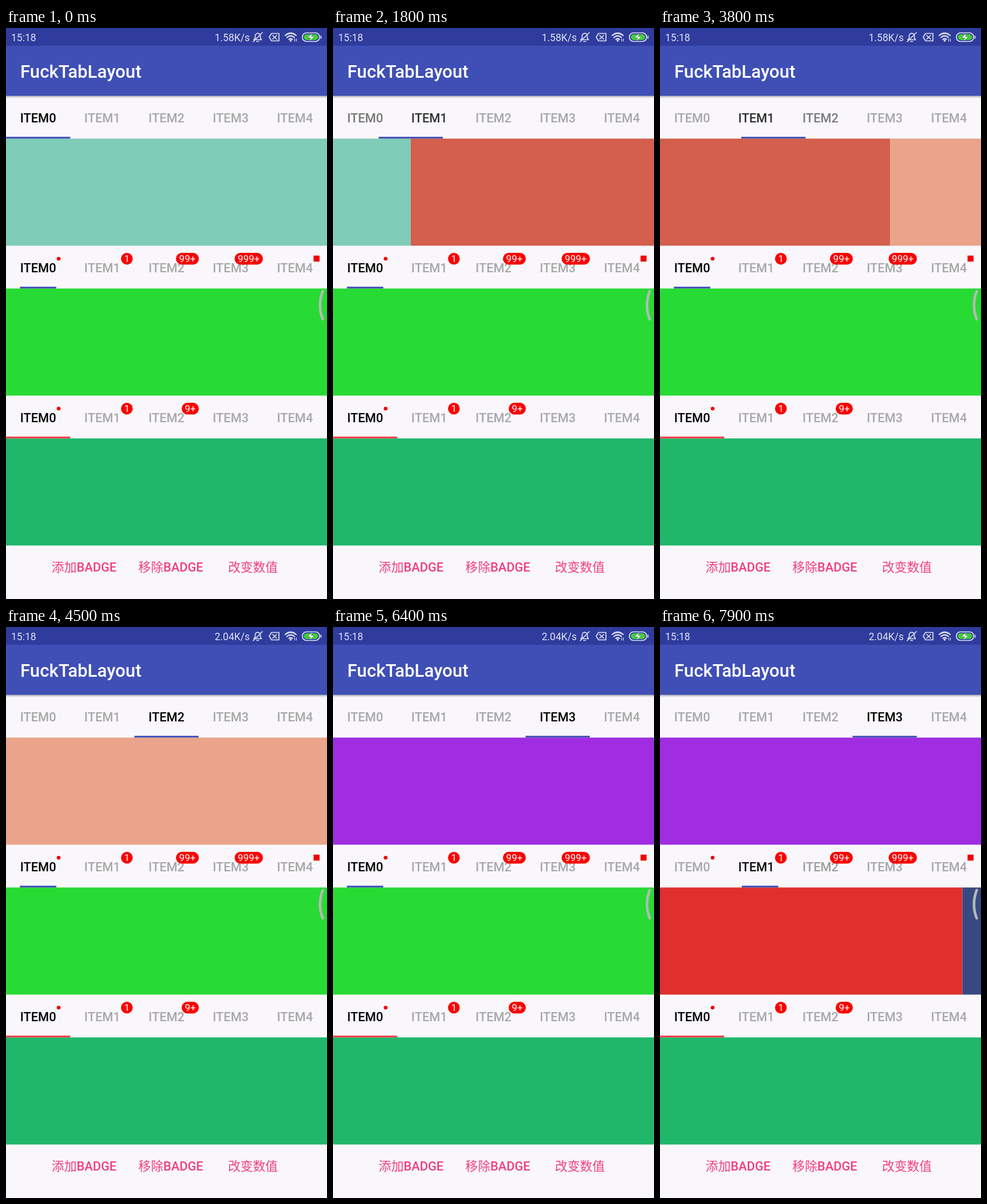
Animation of 561x998 px, one loop 8 s. Source, as an HTML page:

```html
<!DOCTYPE html>
<html lang="zh">
<head>
<meta charset="utf-8">
<title>Tab layout</title>
<style>
  html, body { margin: 0; width: 100%; height: 100%; overflow: hidden; background: #f9f7fb; }
  svg { display: block; width: 100%; height: 100%; }
  text { font-family: Roboto, "Noto Sans CJK SC", "Noto Sans CJK", sans-serif; }
  .tab { font-size: 21.8px; font-weight: 500; text-anchor: middle; }
  .badge { font-size: 17px; fill: #fff; text-anchor: middle; }
  .button { font-size: 21.8px; fill: #f23e80; text-anchor: middle; }
  .button tspan { font-weight: 500; }
  .status { font-size: 17.5px; fill: #dfe2f2; }
  .icon { fill: none; stroke: #dfe2f2; stroke-width: 1.7; stroke-linecap: round; stroke-linejoin: round; }
</style>
</head>
<body>
<svg id="stage" viewBox="0 0 561 998">
  <defs>
    <linearGradient id="shade" x2="0" y2="1">
      <stop stop-color="#000" stop-opacity=".32"/>
      <stop offset="1" stop-color="#000" stop-opacity="0"/>
    </linearGradient>
  </defs>
  <rect width="561" height="998" fill="#f9f7fb"/>
  <g id="rows"></g>

  <rect y="118" width="561" height="5" fill="url(#shade)"/>
  <rect width="561" height="118.5" fill="#3f4fb5"/>
  <rect width="561" height="31" fill="#2f3c9d"/>
  <text x="25" y="87" font-size="31.2" font-weight="500" fill="#fff">FuckTabLayout</text>

  <text class="status" x="9" y="23" font-size="18">15:18</text>
  <text class="status" id="speed" x="426" y="22.5" text-anchor="end"></text>
  <g class="icon">
    <path d="M433 20.5H446.5L444.5 17.5V13.5C444.5 8 435.5 8 435.5 13.5V17.5ZM438 23.5H441.5M432 24L448 8"/>
    <path d="M464 9.5H477V22.5H464L460 16ZM466 13L473 19.5M473 13L466 19.5"/>
    <path stroke-width="2.2" d="M488 13Q497.500 5 507 13M491 16.500Q497.500 11 504 16.500M494.500 19.800Q497.500 17.500 500.500 19.800"/>
    <path stroke-width="1.2" d="M504.500 19V23M507.500 19V23"/>
    <circle cx="497.500" cy="22" r="1" fill="#dfe2f2"/>
    <rect x="518" y="8.500" width="30" height="15" rx="7"/>
    <path d="M550.500 14V18"/>
  </g>
  <rect x="520.500" y="11" width="25" height="10" rx="5" fill="#43cf35"/>
  <path d="M535.500 9L527 17H532.500L530.500 23L539 15H533.500Z" fill="#fff" stroke="#3b5c70" stroke-width=".6"/>

  <text class="button" x="136.500" y="950">添加<tspan>BADGE</tspan></text>
  <text class="button" x="288" y="950">移除<tspan>BADGE</tspan></text>
  <text class="button" x="431.500" y="950">改变数值</text>
  <path d="M553.500 460Q544 485 553.500 509" fill="none" stroke="#b4bab6" stroke-width="4.600" stroke-linecap="round"/>
</svg>
<script>
const W = 561, TAB = W / 5, LOOP = 8000, STEP = 100;
const svgNS = 'http://www.w3.org/2000/svg';
const speed = document.getElementById('speed');

function add(parent, tag, attrs, label) {
  const el = document.createElementNS(svgNS, tag);
  for (const k in attrs) el.setAttribute(k, attrs[k]);
  if (label) el.textContent = label;
  return parent.appendChild(el);
}

// Monotone cubic through [time, position] keys
function track(keys) {
  const slope = i => (keys[i + 1][1] - keys[i][1]) / (keys[i + 1][0] - keys[i][0]);
  const tangent = i => {
    if (i < 1 || i > keys.length - 2) return 0;
    const a = slope(i - 1), b = slope(i);
    return a * b > 0 ? 2 * a * b / (a + b) : 0;
  };
  return t => {
    if (t <= keys[0][0]) return keys[0][1];
    const i = keys.findIndex((k, n) => n < keys.length - 1 && t < keys[n + 1][0]);
    if (i < 0) return keys[keys.length - 1][1];
    const [t0, p0] = keys[i], [t1, p1] = keys[i + 1];
    const d = t1 - t0, u = (t - t0) / d, v = 1 - u;
    return p0 * v * v * (1 + 2 * u) + p1 * u * u * (3 - 2 * u)
      + d * u * v * (v * tangent(i) - u * tangent(i + 1));
  };
}

const rows = [
  {
    y: 118.5, pages: ['#7fccb8', '#d35f4c', '#e9a48b', '#a02de2'],
    bar: '#3f4fb5', inset: 0, lag: 60, badges: [],
    pos: track([[500, 0], [1300, .35], [1800, .758], [2150, 1], [2400, 1], [2800, 1.264],
      [3720, 1.264], [3800, 1.2825], [4100, 1.6], [4450, 2], [5050, 2], [5300, 2.54], [5650, 3]])
  },
  {
    y: 380.5, pages: ['#28da34', '#e0302e', '#384982'],
    bar: '#3f4fb5', inset: 24.3, lag: 0,
    badges: ['dot', '1', '99+', '999+', 'square'],
    pos: track([[6850, 0], [7450, 1], [7800, 1], [7900, 1.058], [8000, 1.2]])
  },
  {
    y: 642.5, pages: ['#20b76b'],
    bar: '#f43b47', inset: 0, lag: 0, badges: ['dot', '1', '9+'],
    pos: () => 0
  }
];

const badgeBox = { '1': [201, 20.5], '9+': [307, 30], '99+': [297, 40], '999+': [399.5, 49.5] };

function drawBadge(g, kind) {
  if (kind === 'dot') add(g, 'circle', { cx: 92, cy: 22.8, r: 3.3, fill: '#f00000' });
  else if (kind === 'square') add(g, 'rect', { x: 537.5, y: 17.3, width: 10.5, height: 10.5, fill: '#f00000' });
  else {
    const [x, w] = badgeBox[kind];
    add(g, 'rect', { x, y: 12.6, width: w, height: 20.5, rx: 10.2, fill: '#fa0000' });
    add(g, 'text', { x: x + w / 2, y: 28.8, class: 'badge' }, kind);
  }
}

function build(row) {
  const g = add(document.getElementById('rows'), 'g', { transform: `translate(0 ${row.y})` });
  row.panes = row.pages.map(fill => add(g, 'rect', { y: 74.8, width: W, height: 187.2, fill }));
  row.tabs = [0, 1, 2, 3, 4].map(i =>
    add(g, 'text', { x: (i + .5) * TAB, y: 46, class: 'tab' }, 'ITEM' + i));
  row.line = add(g, 'rect', { y: 71.7, width: TAB - 2 * row.inset, height: 3.1, fill: row.bar });
  row.badges.forEach(kind => drawBadge(g, kind));
}

function render(t) {
  for (const row of rows) {
    const p = row.pos(t), q = row.pos(t - row.lag);
    row.panes.forEach((pane, i) => pane.setAttribute('x', (i - p) * W));
    row.line.setAttribute('x', q * TAB + row.inset);
    row.tabs.forEach((tab, i) => {
      const c = Math.round(168 * Math.min(1, Math.abs(i - q)));
      tab.setAttribute('fill', `rgb(${c},${c},${c})`);
    });
  }
  speed.textContent = t < 4500 ? '1.58K/s' : '2.04K/s';
}

rows.forEach(build);
const start = performance.now();
function tick() {
  const t = (performance.now() - start) % LOOP;
  render(Math.floor(t / STEP) * STEP);
  requestAnimationFrame(tick);
}
tick();
</script>
</body>
</html>
```
